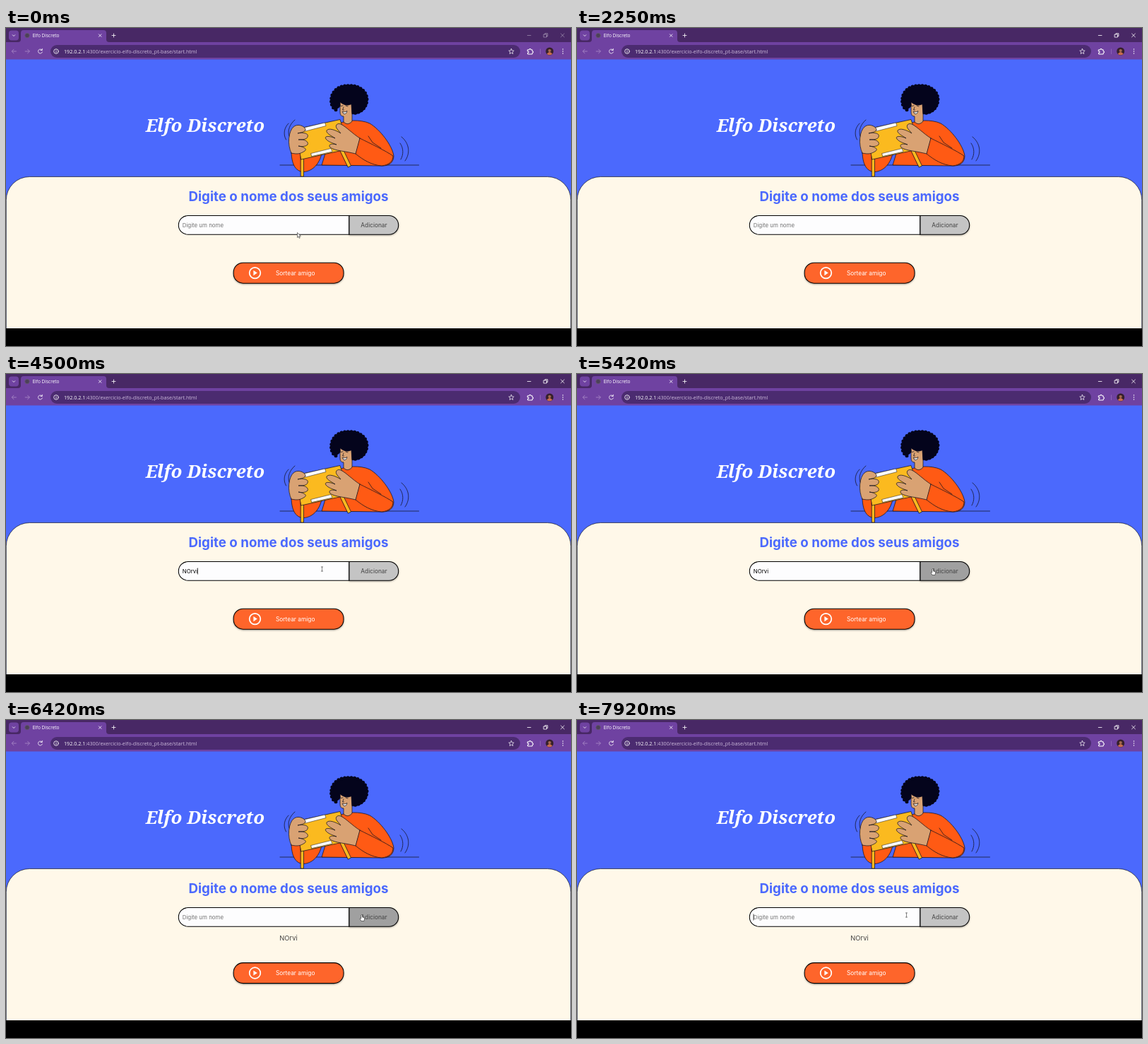
An HTML page for the animation above (8 s loop, 800 by 450 pixels).

```html
<!DOCTYPE html>
<html lang="pt">
<head>
<meta charset="utf-8">
<style>
  html, body { margin: 0; width: 100%; height: 100%; overflow: hidden; background: #000; }
  svg { display: block; width: 100vw; height: 100vh; }
  text { font-family: Inter, sans-serif; white-space: pre; }
  .chrome text { font-family: "Open Sans", "Noto Sans", sans-serif; }
  .line { fill: none; stroke-linecap: round; stroke-linejoin: round; }
  .ink { stroke: #15131f; stroke-width: .75; stroke-linejoin: round; stroke-linecap: round; }
  .skin { fill: #d9a273; }
  .orange { fill: #ff5a14; }
  .yellow { fill: #fbba1f; }
  .shadow { filter: drop-shadow(0 1.6px 1.3px rgba(0, 0, 0, .35)); }
</style>
</head>
<body>
<svg viewBox="0 0 800 450">
  <rect width="800" height="425" fill="#4b69fd"/>

  <g class="chrome">
    <rect width="800" height="24" fill="#482865"/>
    <path d="M0 44.5V20H17Q21 20 21 16V7Q21 3 25 3H138Q142 3 142 7V16Q142 20 146 20H800V44.5Z" fill="#6f42a1"/>
    <rect x="4" y="3.5" width="14" height="14" rx="4" fill="#6f42a1"/>
    <rect x="63" y="24" width="665" height="18" rx="9" fill="#4b2b70"/>
    <circle cx="30" cy="10.6" r="3.2" fill="#4c4058" stroke="#665a70" stroke-width=".8"/>
    <text x="37.5" y="13" font-size="6.5" fill="#fff">Elfo Discreto</text>
    <g class="line" stroke="#fff" stroke-width=".8">
      <path d="M9.3 9.8 11 11.5 12.7 9.8M131.4 8.8 135 12.4M135 8.8 131.4 12.4"/>
      <path d="M50.8 31A3 3 0 1 0 51.4 34M51.3 29.3V31.5H49"/>
      <circle cx="71" cy="33" r="3.3"/><path d="M71 32.7V34.8M71 31.2V31.3"/>
      <path d="M715.5 29.4 716.6 31.9 719.2 32.1 717.2 33.9 717.8 36.5 715.5 35.1 713.2 36.5 713.8 33.9 711.8 32.1 714.4 31.9Z" stroke-width=".7"/>
      <path d="M738.7 30.8H741V29.6H743V30.8H745.2V33H746.3V35H745.2V37H738.7V35H740V33H738.7Z" stroke-width="1"/>
    </g>
    <path class="line" d="M14.4 33H8.4M11 30.2 8.2 33 11 35.8M27.2 33H33.2M30.6 30.2 33.4 33 30.6 35.8" stroke="#a585c5" stroke-width=".9"/>
    <path class="line" d="M150 10.5H155M152.5 8V13" stroke="#fff" stroke-width=".8"/>
    <path id="controls" class="line" d="M738.3 10.5H743M761.5 9H765.5V13H761.5ZM763 9V7.7H766.9V11.6H765.5M785.6 8 790.4 12.8M790.4 8 785.6 12.8" stroke="#fff" stroke-width=".8"/>
    <text x="82" y="35.6" font-size="7.2" fill="#cdbbdc"><tspan fill="#fff">192.0.2.1</tspan>:4300/exercicio-elfo-discreto_pt-base/start.html</text>
    <path d="M756.5 29.5V37" stroke="#8b62b5"/>
    <circle cx="769.7" cy="33" r="5.5" fill="#36202b"/>
    <path d="M765.7 36.7Q769.7 31.5 773.7 36.7Q769.7 40 765.7 36.7Z" fill="#c96d4d"/>
    <circle cx="769.7" cy="32" r="2.1" fill="#a46a50"/>
    <path d="M788.5 29.9V36.3" stroke="#fff" stroke-width="1.5" stroke-linecap="round" stroke-dasharray="0 3"/>
  </g>

  <text x="282" y="147.3" text-anchor="middle" font-size="25.8" font-weight="700" font-style="italic" fill="#fff" style="font-family:'Noto Serif',serif">Elfo Discreto</text>

  <g class="ink">
    <path d="M388 194H584.5"/>
    <path class="orange" d="M404 174C404 191 409 203 421 203.5C433 203 443 194 447 178L430 165Z"/>
    <path class="orange" d="M470 136C480 130 502 129 515 135C529 143 547 166 549 181C549 191 541 196 530 195L447 194 455 168Z"/>
    <path class="skin" d="M473 105V119Q473 125 478 125V133Q484 139 490 132V104Z"/>
    <g fill="#04041c" stroke="#04041c" transform="translate(0 -1.3)">
      <path d="M473 112C466 121 459 113 461 102C463 87 474 82 487 82C502 82 512 92 512 103C512 117 501 124 490 123L489 109Q481 113 473 106Z"/>
      <path fill="none" stroke-width="5" stroke-dasharray="0 4.6" d="M467 117C459 112 460 102 462 96C467 85 476 83 487 83C501 83 511 91 511 103C510 115 502 121 492 122"/>
    </g>
    <path fill="none" d="M474.5 110.5 477 109.8M481 110 484 111M478 112 476.5 116H478.5"/>
    <path fill="#fff" d="M476.5 118.5Q480 120 483 117.5Q482 122.5 478.5 121.5Z"/>
    <path class="yellow" d="M417.5 182H421.5V210H417.5ZM472 171 476 169 488.5 195 484.5 197Z"/>
    <path class="yellow" d="M411 143 473 129.5 486 171 418 186Z"/>
    <path fill="#fff" stroke-width=".5" d="M422 141 451.5 134 453 138.5 424 146ZM432 177.5 460 170.5 462 175 433 181.5Z"/>
    <path class="skin" d="M404 177C398 165 400 146 407 140C412 135 422 138 424 143C425 147 417 148 413 149C423 147 429 150 427 154C426 158 419 158 414 158C423 157 429 161 427 165C424 168 419 168 414 167C421 168 427 171 423 174C417 178 413 179 404 177Z"/>
    <path class="skin" d="M501 156C490 149 482 140 474 136C469 134 465 138 469 143L474 149C466 144 457 141 454 145C453 149 460 152 466 156C457 152 450 153 453 157C456 161 463 163 468 165C460 163 456 165 459 169C466 174 480 174 495 178Z"/>
    <path class="orange" d="M501 156 495 178C506 187 518 194 532 195C542 194 548 189 548 181C538 174 515 163 501 156Z"/>
    <path fill="none" d="M513 153 519 162 531 170M396.5 158C392 150 394 141 400 135M401 153C398 145 402 136 409 130M558 163C563 170 563 179 559 186M560 154C571 163 573 177 565 188"/>
  </g>

  <path d="M.3 425V243.5A33 33 0 0 1 33.3 210.5H766.7A33 33 0 0 1 799.7 243.5V425" fill="#fff8e9" stroke="#000" stroke-width=".6"/>
  <text x="400" y="245.1" text-anchor="middle" font-size="18.75" font-weight="700" fill="#4b69fd">Digite o nome dos seus amigos</text>

  <path d="M486 265.5H257.7A13.4 13.4 0 0 0 257.7 292.3H486Z" fill="#fdfdfe" stroke="#000" stroke-width="1.05"/>
  <path id="addButton" class="shadow" d="M486 265.5H542.3A13.4 13.4 0 0 1 542.3 292.3H486Z" stroke="#000" stroke-width="1.05"/>
  <text x="521" y="281.8" text-anchor="middle" font-size="8.33" fill="#444">Adicionar</text>
  <text id="field" x="249.7" y="281.8" font-size="7.9"></text>
  <path id="caret" d="M0 274.5V283.5" stroke="#000" stroke-width=".7"/>
  <text id="friend" x="400" y="312" text-anchor="middle" font-size="9.4" fill="#444">NOrvi</text>

  <g id="draw">
    <rect class="shadow" x="322.2" y="332.2" width="155.8" height="29" rx="13.5" fill="#fe652b" stroke="#000" stroke-width="1.05"/>
    <circle cx="352.5" cy="346.6" r="7.8" fill="none" stroke="#fff" stroke-width="1.7"/>
    <path d="M350.4 343V350.2L355.8 346.6Z" fill="#fff"/>
    <text x="409.7" y="349.6" text-anchor="middle" font-size="8.33" fill="#fff">Sortear amigo</text>
  </g>

  <g id="pointer">
    <path id="arrow" d="M0 0V7L1.6 5.5 2.7 8 3.8 7.5 2.7 5.1H4.9Z" fill="#fff" stroke="#222" stroke-width=".6"/>
    <path id="beam" class="line" d="M-1.2-3H1.2M0-3V3M-1.2 3H1.2" stroke="#555" stroke-width=".7"/>
    <path id="hand" d="M-1.8-4.2Q-.8-5.4 0-4.2V-1.6L2.5-.9Q3.4-.6 3.2.5L2.5 4H-1.4L-3.5.7Q-3.3-.6-1.8.6Z" fill="#fff" stroke="#222" stroke-width=".6"/>
  </g>
</svg>
<script>
  const LOOP = 8000, NAME = "NOrvi";
  const KEY_TIMES = [3480, 3650, 3820, 3990, 4150];
  const ADD_TIME = 5560;
  const PATH = [
    [0, 412.5, 289.5], [2350, 412.5, 289.5], [2750, 447.5, 276], [4700, 447.5, 276],
    [5080, 504.5, 280.5], [6850, 504.5, 280.5], [7250, 466.5, 276], [LOOP, 466.5, 276]
  ];
  const $ = id => document.getElementById(id);
  const show = (id, on) => $(id).style.display = on ? "" : "none";
  const within = (t, from, to) => t >= from && t < to;

  function pointerAt(t) {
    const i = PATH.findIndex(point => point[0] > t);
    const [t0, x0, y0] = PATH[i - 1], [t1, x1, y1] = PATH[i];
    const p = (t - t0) / (t1 - t0), ease = p * p * (3 - 2 * p);
    return [x0 + (x1 - x0) * ease, y0 + (y1 - y0) * ease];
  }

  function render(t) {
    const added = t >= ADD_TIME;
    const typed = added ? "" : NAME.slice(0, KEY_TIMES.filter(k => t >= k).length);
    const [x, y] = pointerAt(t);
    const hover = x > 486;
    const early = t < 450;

    $("controls").style.opacity = early ? .45 : 1;
    $("pointer").setAttribute("transform", `translate(${x} ${y})`);
    show("pointer", early || t >= 2350);
    show("arrow", early);
    show("beam", !early && !hover);
    show("hand", hover);
    $("addButton").setAttribute("fill", hover ? "#a0a0a0" : "#c4c4c4");

    const field = $("field");
    field.textContent = typed || "Digite um nome";
    field.setAttribute("fill", typed ? "#000" : "#757575");
    const caretX = 250 + (typed ? field.getComputedTextLength() : 0);
    $("caret").setAttribute("transform", `translate(${caretX} 0)`);
    show("caret", within(t, 2850, 3370) || within(t, 3450, 4670) || within(t, 7430, 7960));

    show("friend", added);
    $("draw").setAttribute("transform", `translate(0 ${added ? 11.4 : 0})`);
  }

  const start = performance.now();
  function tick() {
    render((performance.now() - start) % LOOP);
    requestAnimationFrame(tick);
  }
  tick();
</script>
</body>
</html>
```
